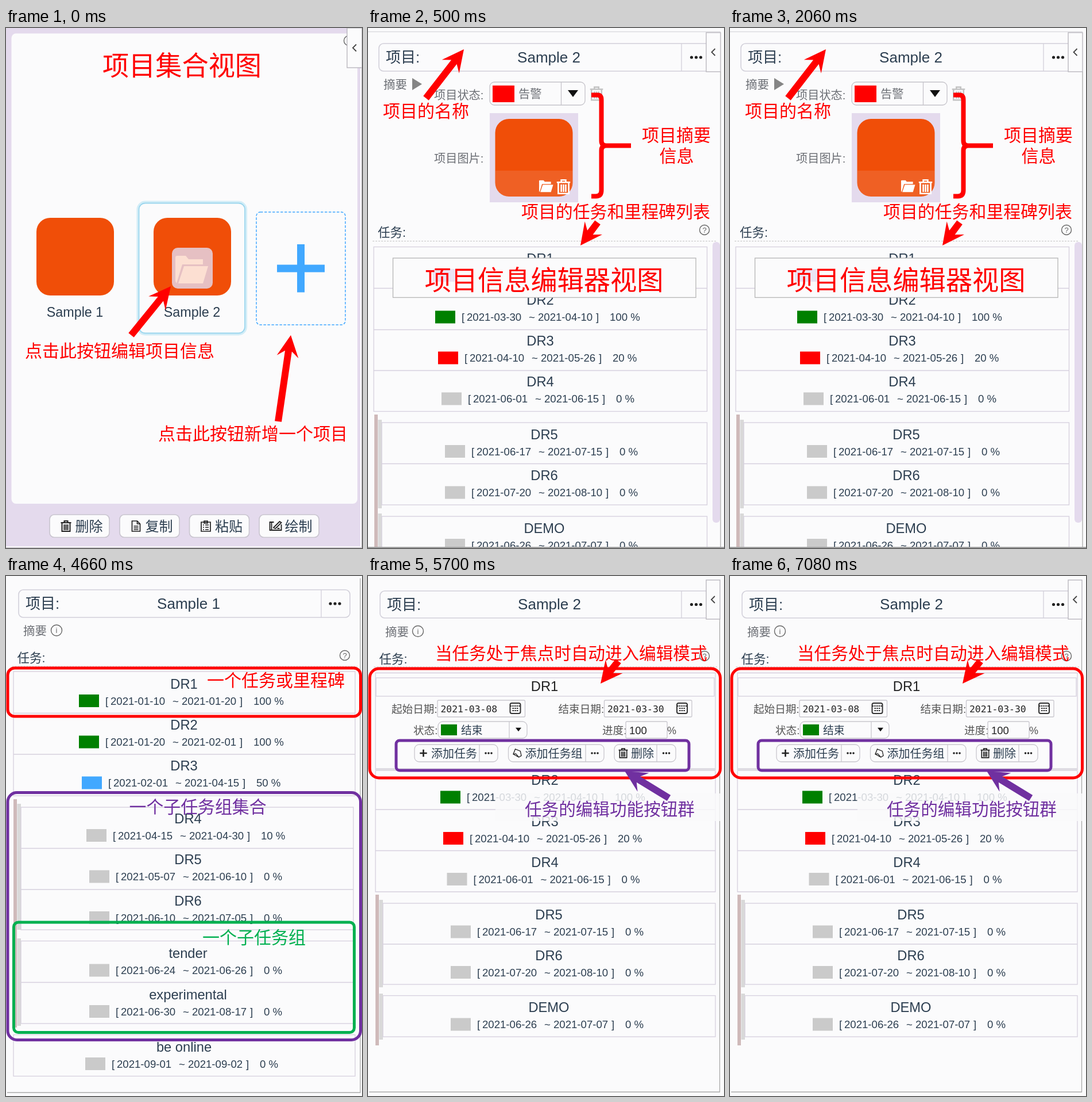
Recreate the animation shown at these times as an HTML page. Size 620 by 904 pixels, loop 8 s.

```html
<!DOCTYPE html>
<html lang="zh-CN">
<head>
<meta charset="utf-8">
<style>
html, body { margin: 0; width: 100%; height: 100%; overflow: hidden; background: #fbfbfc; }
svg { display: block; width: 620px; height: 904px; }
text { font-family: "Liberation Sans", "Noto Sans CJK SC", "Noto Sans CJK", sans-serif; white-space: pre; }
.mono { font-family: "DejaVu Sans Mono", monospace; }
</style>
</head>
<body>
<svg id="stage" viewBox="0 0 620 904"></svg>
<script>
const INK = '#2c3e50', GREY = '#6c6f75', RED = '#ff0000', PURPLE = '#7030a0', GREEN = '#008000',
  BLUE = '#41a8ff', LILAC = '#e4daed', EDGE = '#d6d0de', PAPER = '#fbfbfc', SILVER = '#cacaca';

// Text is placed by its vertical centre.
const text = (x, cy, size, str, fill = INK, anchor = 'start', extra = '') =>
  `<text x="${x}" y="${cy + size * 0.365}" font-size="${size}" fill="${fill}" text-anchor="${anchor}" ${extra}>${str}</text>`;
const mid = (x, cy, size, str, fill) => text(x, cy, size, str, fill, 'middle');
const box = (x1, y1, x2, y2, fill = 'none', stroke = 'none', rx = 0, w = 1.3, extra = '') =>
  `<rect x="${x1}" y="${y1}" width="${x2 - x1}" height="${y2 - y1}" rx="${rx}" fill="${fill}" stroke="${stroke}" stroke-width="${w}" ${extra}/>`;
const line = (d, stroke = EDGE, w = 1.3, extra = '') =>
  `<path d="${d}" fill="none" stroke="${stroke}" stroke-width="${w}" ${extra}/>`;
const shape = (d, fill, extra = '') => `<path d="${d}" fill="${fill}" ${extra}/>`;
const frame = (x1, y1, x2, y2, color, rx) => box(x1, y1, x2, y2, 'none', color, rx, 5);
const dots = (x, y, r = 2.6, gap = 8) =>
  [-gap, 0, gap].map(dx => `<circle cx="${x + dx}" cy="${y}" r="${r}" fill="#222"/>`).join('');
const badge = (x, y, mark, r = 8.5) =>
  `<circle cx="${x}" cy="${y}" r="${r}" fill="none" stroke="#666" stroke-width="1.4"/>` + mid(x, y, 13, mark, '#666');
const logo = (x, y) => box(x, y, x + 135, y + 135, '#f04e08', 'none', 24);

function arrow(x1, y1, x2, y2, color = RED) {
  const len = Math.hypot(x2 - x1, y2 - y1), angle = Math.atan2(y2 - y1, x2 - x1) * 180 / Math.PI;
  return shape(`M0 -6H${len - 28}L${len - 38} -19L${len} 0L${len - 38} 19L${len - 28} 6H0Z`, color,
    `transform="translate(${x1} ${y1}) rotate(${angle})"`);
}

// Icons use a 20 x 20 grid centred on the given point.
const icon = (x, y, body, color = '#222', scale = 1) =>
  `<g transform="translate(${x} ${y}) scale(${scale})" fill="none" stroke="${color}" stroke-width="2">${body}</g>`;
const TRASH = '<path d="M-9 -6H9M-3 -6V-9H3V-6M-7 -5V9H7V-5M-3 -3V7M0 -3V7M3 -3V7"/>';
const FILE = '<path d="M-7 -9H2L7 -4V9H-7ZM2 -9V-4H7M-4 0H4M-4 3H4M-4 6H4" stroke-width="1.7"/>';
const CLIP = '<path d="M-8 -7H8V9H-8ZM-3 -9H3V-5H-3ZM-5 -2H-3M-1 -2H5M-5 2H-3M-1 2H5M-5 6H-3M-1 6H5" stroke-width="1.7"/>';
const DRAW = '<path d="M-3 -7H-10V7H10V-3M-7 -7V7M-4 3L7 -8L10 -6L0 4L-4 3M3 4H7" stroke-width="1.8"/>';
const CALENDAR = '<rect x="-9" y="-9" width="18" height="18" rx="3"/><path d="M-9 -4H9M-5 0H5M-5 4H5" stroke-dasharray="2.5 1.2"/>';
const PLUS = '<path d="M-7 0H7M0 -7V7" stroke-width="3"/>';
const TAG = '<path d="M-4 -8L6 -4L8 5L3 8L-8 2ZM-8 2L-3 1L3 8" stroke-width="1.5"/>';
const folder = (x, y, s) => shape('M-28 20V-21Q-28 -24 -25 -24H-10L-5 -18H20V-9H-16L-26 24ZM-13 -6H29L20 24H-23Z',
  '#fff', `transform="translate(${x} ${y}) scale(${s})"`);
const down = (x, y, w) => shape(`M${x - w} ${y - w * .67}H${x + w}L${x} ${y + w * .67}Z`, '#111');

const tab = (x, y, w, h) => box(x, y, x + w, y + h, PAPER, '#b5b3ba') +
  line(`M${x + w / 2 + 3} ${y + h / 2 - 6}l-6 6l6 6`, '#444', 1.8);

const header = (x1, y1, x2, y2, split, name, cx) => {
  const cy = (y1 + y2) / 2;
  return box(x1, y1, x2, y2, PAPER, '#d2d0da', 8, 1.6) + line(`M${split} ${y1}V${y2}`, '#d2d0da') +
    text(x1 + 12, cy, 26, '项目:') + mid(cx, cy - .5, 26, name) + dots((split + 599) / 2 - 1, cy);
};

const row = (cx, y, name, x, from, to, done, color = SILVER) =>
  mid(cx, y, 23.7, name) + box(x, y + 19, x + 35, y + 41, color) +
  [[46, '['], [55, from], [163, '~'], [179, to], [280, ']'], [304, done + ' %']]
    .map(([dx, s]) => text(x + dx, y + 30, 18.6, s)).join('');
const table = (x1, x2, ...ys) => box(x1, ys[0], x2, ys.at(-1), 'none', EDGE) +
  ys.slice(1, -1).map(y => line(`M${x1} ${y}H${x2}`)).join('');
const bars = (x, y1, y2, ...parts) => box(x, y1, x + 6, y2, '#cfbaba') +
  parts.map(([a, b]) => box(x + 6.5, a, x + 13, b, '#d9d9d9')).join('');
const tasksHead = (x, y, qx, qy, ruleY) => text(x, y, 21.5, '任务:') + badge(qx, qy, '?') +
  line(`M${x - 9} ${ruleY}H${qx + 22}`, '#c4c4c4', 1.2, 'stroke-dasharray="3 2"');

function collectionView() {
  const tools = [[76, TRASH, '删除'], [198, FILE, '复制'], [319.5, CLIP, '粘贴'], [441, DRAW, '绘制']];
  return box(0, 0, 620, 904, LILAC) + box(9.5, 9.5, 612, 827, PAPER, 'none', 8) +
    line('M618 70V902H0', '#fff', 2) + line('M619.5 70V903.3H0', '#b9b5bd', 1) +
    badge(597, 22, '') + tab(594, 0, 26, 69) +
    mid(306.5, 65, 46.2, '项目集合视图', RED) +
    logo(53, 330) + mid(120, 493, 23.3, 'Sample 1') +
    box(230.5, 303.5, 417, 531.5, 'none', '#d3edf7', 12, 6) + box(231.5, 304.5, 416, 530.5, PAPER, '#9bd6ee', 11, 1.8) +
    logo(257, 330) + mid(324, 493, 23.3, 'Sample 2') +
    `<g opacity=".82">${box(289, 382, 360, 453, LILAC, 'none', 10)}${folder(323, 420, 1)}</g>` +
    box(436, 320, 591, 516, 'none', BLUE, 7, 1.5, 'stroke-dasharray="4.5 2.5"') +
    line('M472 418H555M513.5 376V459.5', BLUE, 13) +
    arrow(218, 534, 287, 449) + arrow(474, 684, 496, 534) +
    text(33, 561, 30, '点击此按钮编辑项目信息', RED) + text(265, 705, 30, '点击此按钮新增一个项目', RED) +
    tools.map(([x, art, label]) => box(x, 846, x + 104, 885.5, PAPER, '#c9c5cf', 8, 1.6) +
      icon(x + 28.5, 866, art) + text(x + 44.5, 866, 24, label)).join('');
}

function summaryView() {
  return line('M0 6.5H614', '#dcdce0') + line('M614 76V902', '#aaa') +
    header(19, 27, 599, 75, 546, 'Sample 2', 315) + box(590, 20, 613, 80, PAPER) + tab(589, 8, 25, 68) +
    text(27, 99, 20.5, '摘要', GREY) + shape('M77 87L94 97.5L77 108Z', '#858585') +
    text(115, 117, 20.2, '项目状态:', GREY) + box(212, 94, 378, 134, PAPER, '#c5c3ca', 8) +
    line('M336.5 94V134', '#c5c3ca') + box(217, 100, 255, 129, RED) + text(262, 115, 20.3, '告警', GREY) +
    down(357, 114, 9) + icon(398, 114, TRASH, '#c3c3c3', 1.25) +
    text(115, 227, 20.2, '项目图片:', GREY) + box(212, 148, 366, 303, LILAC) + logo(221.5, 158) +
    box(222, 248, 356.5, 293, LILAC, 'none', 0, 0, 'opacity=".12"') +
    folder(310, 275, .43) + icon(340.5, 276, TRASH, '#fff', 1.3) +
    line('M389 116.5H400Q406.5 116.5 406.5 125V196Q406.5 204.5 415 204.5H458M415 204.5Q406.5 204.5 406.5 213V282Q406.5 292.5 397 292.5H389', RED, 8) +
    text(477, 186, 30, '项目摘要', RED) + text(507.5, 222, 30, '信息', RED) +
    arrow(101, 122, 167, 37) + text(26, 144, 30, '项目的名称', RED) +
    text(267, 319, 29.9, '项目的任务和里程碑列表', RED) +
    tasksHead(17, 355, 586, 351, 370.5) + arrow(400, 338, 370, 378) +
    table(10, 590.5, 380.5, 452.5, 524.5, 595.5, 666.5) + mid(300, 400, 23.7, 'DR1') +
    row(300, 472.5, 'DR2', 117, '2021-03-30', '2021-04-10', 100, GREEN) +
    row(300, 543.5, 'DR3', 122, '2021-04-10', '2021-05-26', 20, RED) +
    row(300, 614.5, 'DR4', 128, '2021-06-01', '2021-06-15', 0) +
    bars(11, 672, 902, [681, 835], [844, 902]) + table(24, 590.5, 686, 757.5, 829) +
    row(307, 706, 'DR5', 134, '2021-06-17', '2021-07-15', 0) +
    row(307, 777.5, 'DR6', 134, '2021-07-20', '2021-08-10', 0) +
    table(24, 590.5, 849, 920) + row(307, 869, 'DEMO', 134, '2021-06-26', '2021-07-07', 0) +
    box(600, 372, 613, 860, LILAC, 'none', 6) + box(0, 902, 620, 904, '#fff') + line('M0 903H620', '#444', 1) +
    box(43.5, 400, 571, 468.5, PAPER, '#b5b5b5') + box(113, 419, 152, 441, '#ebe3f3') +
    mid(306.5, 438.5, 46.2, '项目信息编辑器视图', RED);
}

function groupsView() {
  return line('M617 4V898H2', '#aaa') + header(22, 24, 599, 72, 549, 'Sample 1', 318) +
    text(30, 96, 20.5, '摘要', GREY) + badge(88, 94.5, 'i', 9.5) + tasksHead(19.5, 142, 590, 138, 157) +
    table(13, 608, 166, 238.5, 310, 382) +
    row(310, 187, 'DR1', 127, '2021-01-10', '2021-01-20', 100, GREEN) +
    row(310, 258.5, 'DR2', 127, '2021-01-20', '2021-02-01', 100, GREEN) +
    row(310, 329.5, 'DR3', 132, '2021-02-01', '2021-04-15', 50, BLUE) +
    bars(13, 388, 785, [396, 615], [630, 782]) + table(26, 605, 402, 473.5, 545, 615) +
    row(317, 421, 'DR4', 140, '2021-04-15', '2021-04-30', 10) +
    row(317, 492.5, 'DR5', 145, '2021-05-07', '2021-06-10', 0) +
    row(317, 564, 'DR6', 145, '2021-06-10', '2021-07-05', 0) +
    table(26, 605, 634.5, 706.5, 778) +
    row(317, 655.5, 'tender', 145, '2021-06-24', '2021-06-26', 0) +
    row(317, 727, 'experimental', 145, '2021-06-30', '2021-08-17', 0) +
    table(13, 608, 797.5, 869.5) + row(310, 818, 'be online', 138, '2021-09-01', '2021-09-02', 0) +
    frame(3, 160, 617.5, 244, RED, 12) + text(350, 181, 30, '一个任务或里程碑', RED) +
    frame(3, 376.5, 617.5, 806.5, PURPLE, 16) + text(214.5, 401, 29.9, '一个子任务组集合', PURPLE) +
    frame(13.5, 602, 606.5, 793.5, '#00b050', 8) + text(342, 628, 30, '一个子任务组', '#00b050');
}

function editView() {
  const date = (x, label, value) => text(x, 231, 18.6, label, '#555') + box(x + 80, 216, x + 232.5, 245, PAPER, '#c9c7ce', 2) +
    text(x + 85.5, 231, 16.4, value, '#222', 'start', 'class="mono"') + icon(x + 215.5, 230, CALENDAR, '#333');
  const button = (x1, split, x2, art, label) => box(x1, 293, x2, 323, PAPER, '#c9c7ce', 8) +
    line(`M${split} 293V323`, '#c9c7ce') + icon(x1 + 15.5, 308, art, '#222', .88) +
    text(x1 + 29, 309, 20, label) + dots((split + x2) / 2, 308, 1.8, 5);
  return line('M612.5 75V897H2', '#aaa') + header(21, 26, 599, 73, 546, 'Sample 2', 316) +
    box(590, 20, 612, 80, PAPER) + tab(589, 7, 24, 68) +
    text(30, 98, 20.5, '摘要', GREY) + badge(87, 96, 'i', 9.5) + tasksHead(19.5, 144, 586, 139, 158) +
    line('M13 338V168.5H605V338') + box(13, 334, 605, 339, '#dedce2') + box(14, 177, 603, 209, 'none', EDGE) +
    mid(307.5, 191, 23.7, 'DR1', '#222') +
    date(41, '起始日期:', '2021-03-08') + date(331.5, '结束日期:', '2021-03-30') +
    text(79, 268, 18.6, '状态:', '#555') + box(122, 253, 277, 282, PAPER, '#c9c7ce', 8) +
    line('M246 253V282', '#c9c7ce') + box(127, 258, 155, 277, GREEN) + text(162, 268, 18.8, '结束') + down(262, 267, 5) +
    text(408, 268, 18.6, '进度:', '#555') + box(449, 253, 521, 282, PAPER, '#c9c7ce', 2) +
    text(455, 268, 18.4, '100', '#222') + text(521, 268, 18, '%', '#555') +
    button(81, 194, 226, PLUS, '添加任务') + button(244.5, 379, 411, TAG, '添加任务组') + button(429, 503, 536, TRASH, '删除') +
    line('M13 339V549H605V339M13 406H605M13 477.5H605') +
    row(308, 354.5, 'DR2', 126, '2021-03-30', '2021-04-10', 100, GREEN) +
    row(308, 426, 'DR3', 131, '2021-04-10', '2021-05-26', 20, RED) +
    row(308, 497, 'DR4', 137.5, '2021-06-01', '2021-06-15', 0) +
    box(222, 378, 620, 426, PAPER, 'none', 0, 0, 'opacity=".82"') +
    bars(13, 554, 816, [563, 715], [726, 806]) + table(26, 605, 569, 640, 710) +
    row(315, 588.5, 'DR5', 144, '2021-06-17', '2021-07-15', 0) +
    row(315, 659, 'DR6', 144, '2021-07-20', '2021-08-10', 0) +
    table(26, 605, 729.5, 801) + row(315, 749.5, 'DEMO', 144, '2021-06-26', '2021-07-07', 0) +
    frame(3, 161, 613.5, 351, RED, 16) + frame(49, 286, 559, 338, PURPLE, 6) +
    text(117, 134, 29.6, '当任务处于焦点时自动进入编辑模式', RED) + arrow(436, 148, 405, 187) +
    text(273, 405, 29.6, '任务的编辑功能按钮群', PURPLE) + arrow(524, 386, 447, 339, PURPLE);
}

const stage = document.getElementById('stage');
const views = [collectionView, summaryView, groupsView, editView];
const starts = [0, 500, 3100, 5700], LOOP = 8000;
stage.innerHTML = views.map(v => `<g display="none">${box(0, 0, 620, 904, PAPER)}${v()}</g>`).join('');
const began = performance.now();
function tick() {
  const t = (performance.now() - began) % LOOP;
  const current = starts.findLastIndex(s => t >= s);
  [...stage.children].forEach((g, i) => g.setAttribute('display', i === current ? 'inline' : 'none'));
  requestAnimationFrame(tick);
}
tick();
</script>
</body>
</html>
```
